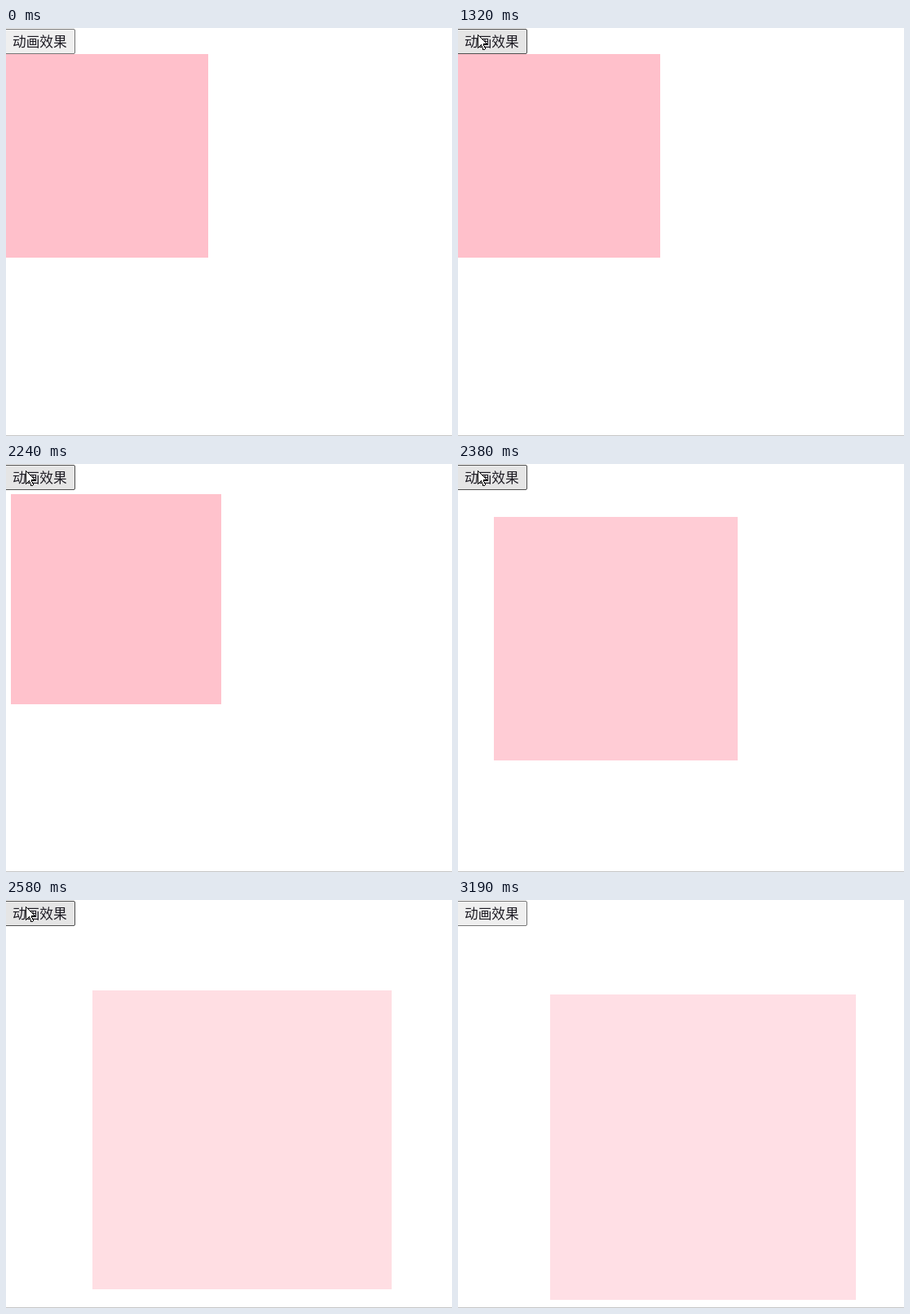
Write an HTML page that moves like this. It is 547 px wide and 501 px high and loops after 3.45 s.

```html
<!DOCTYPE html>
<html lang="zh-CN">
<head>
<meta charset="utf-8">
<style>
  html, body { margin: 0; width: 100%; height: 100%; overflow: hidden; background: #fff; }
  svg { display: block; }
  text { font: 300 16.67px "Noto Sans CJK SC", "Noto Sans CJK", sans-serif; fill: #1c1a22; }
</style>
</head>
<body>
<svg width="547" height="501" viewBox="0 0 547 501">
  <rect width="547" height="501" fill="#fff"/>
  <rect y="500" width="547" height="1" fill="#c6c6c6"/>
  <rect id="box" fill="#ffc0cb" shape-rendering="crispEdges"/>
  <rect id="button" x="-1.5" y="1.5" width="86" height="30" rx="1.5"/>
  <text x="8" y="23">动画效果</text>
  <path id="cursor" d="M.5 .5V16.5L4.5 12.5L7 18.5H8.5L9.5 17.5L7 11.5H11.5Z"
    fill="#fff" stroke="#000" stroke-linejoin="round" shape-rendering="crispEdges"/>
</svg>
<script>
const LOOP = 3450, STEP = 68;
const PRESS = 2050, GROW_START = 2160, GROW_TIME = 500, GROW_PHASE = 2240;
const el = id => document.getElementById(id);
const box = el('box'), button = el('button'), cursor = el('cursor');

// Each pass moves the pointer during `time`, then rests until `end`.
const passes = [
  { start: 530, end: 660, time: 68, from: [482, 53], to: [354, 11] },
  { start: 1060, end: 2650, time: 200, from: [44, 3], to: [24, 8] },
  { start: 2650, end: 3190, time: 430, from: [24, 8], to: [465, 488] }
];

const looks = {
  idle: { fill: '#efefef', stroke: '#767676' },
  hover: { fill: '#e5e5e5', stroke: '#4f4f4f' },
  active: { fill: '#f5f5f5', stroke: '#8d8d8d' }
};

const clamp = u => Math.min(1, Math.max(0, u));
const swing = u => 0.5 - Math.cos(Math.PI * clamp(u)) / 2;
const mix = (a, b, p) => a + (b - a) * p;
// The picture advances in steps, counted from a given moment.
const held = (t, origin) => origin + Math.floor((t - origin) / STEP) * STEP;

function set(node, attrs) {
  for (const name in attrs) node.setAttribute(name, attrs[name]);
}

function pointerAt(t) {
  const pass = passes.find(({ start, end }) => t >= start && t < end);
  if (!pass) return null;
  const { start, time, from, to } = pass;
  const p = swing((held(t, start) - start) / time);
  return from.map((v, i) => Math.round(mix(v, to[i], p)));
}

function drawBox(t) {
  const p = swing((held(t, GROW_PHASE) - GROW_START) / GROW_TIME);
  const size = Math.round(mix(250, 375, p));
  set(box, {
    x: Math.round(mix(-1.55, 113.45, p)),
    y: Math.round(mix(31.8, 116, p)),
    width: size,
    height: size,
    'fill-opacity': mix(1, 0.5, p)
  });
}

function draw(t) {
  drawBox(t);
  const at = pointerAt(t);
  const over = at && at[0] < 85 && at[1] < 32;
  const pressed = t >= PRESS && t < PRESS + STEP;
  set(button, pressed ? looks.active : over ? looks.hover : looks.idle);
  set(cursor, {
    visibility: at ? 'visible' : 'hidden',
    transform: at ? `translate(${at})` : ''
  });
}

const start = performance.now();
function frame() {
  draw((performance.now() - start) % LOOP);
  requestAnimationFrame(frame);
}
draw(0);
requestAnimationFrame(frame);
</script>
</body>
</html>
```
